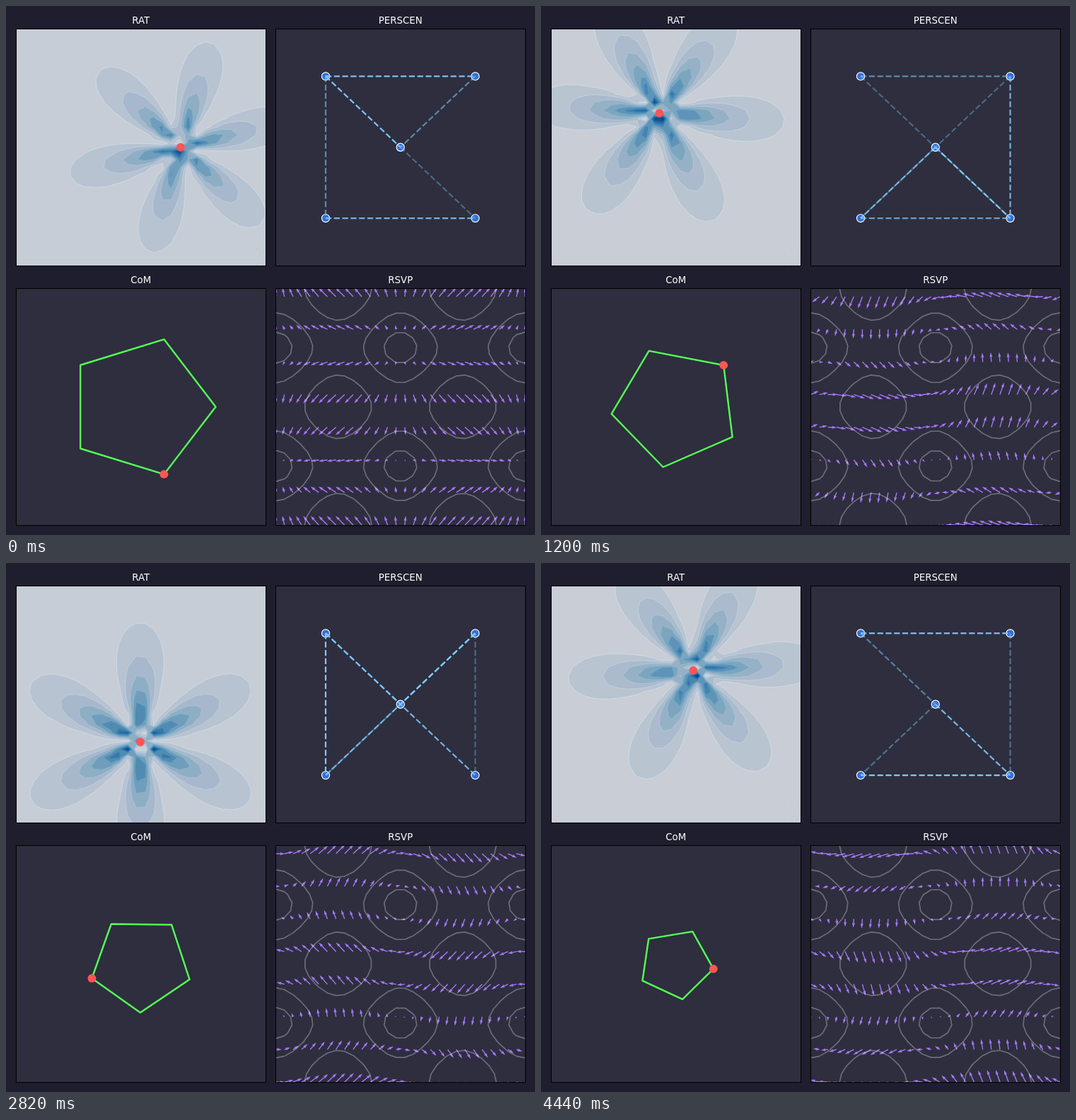
An HTML page for the animation above (4.5 s loop, 748x748 px).

```html
<!DOCTYPE html>
<html lang="en">
<head>
<meta charset="utf-8">
<title>Four panels</title>
<style>
  html, body { margin: 0; width: 100%; height: 100%; overflow: hidden; background: #1e1e2e; }
  svg { display: block; width: 100vw; height: 100vh; }
  text { font: 13.333px "DejaVu Sans", sans-serif; fill: #fff; text-anchor: middle; }
</style>
</head>
<body>
<svg id="stage" viewBox="0 0 748 748"></svg>
<script>
const NS = "http://www.w3.org/2000/svg";
const W = 352.5, H = 334.5, PI = Math.PI;
const N = 30, STEP = 2 * PI / (N - 1);
const grid = Array.from({ length: N }, (_, i) => -PI + i * STEP);
const stage = document.getElementById("stage");

function add(parent, tag, attrs) {
  const el = document.createElementNS(NS, tag);
  set(el, attrs);
  parent.appendChild(el);
  return el;
}
function set(el, attrs) {
  for (const k in attrs) el.setAttribute(k, attrs[k]);
}
const fix = v => v.toFixed(2);

// A square plot spanning -PI..PI on both axes.
function panel(x, y, title, id) {
  const box = { x, y, width: W, height: H };
  const clip = add(stage, "clipPath", { id });
  add(clip, "rect", box);
  add(stage, "rect", { ...box, fill: "#2e2e3e" });
  const body = add(stage, "g", { "clip-path": `url(#${id})` });
  add(stage, "rect", { ...box, fill: "none", stroke: "#000", "shape-rendering": "crispEdges" });
  add(stage, "text", { x: x + W / 2, y: y - 7.4 }).textContent = title;
  return {
    body,
    top: add(stage, "g", {}),
    px: v => x + W * (v + PI) / (2 * PI),
    py: v => y + H * (PI - v) / (2 * PI)
  };
}

const rat = panel(14.5, 32.5, "RAT", "c0");
const net = panel(381.5, 32.5, "PERSCEN", "c1");
const com = panel(14.5, 399.5, "CoM", "c2");
const rsvp = panel(381.5, 399.5, "RSVP", "c3");

// Area at or above a level, and its boundary, as path strings.
function contour(p, z, level) {
  let fill = "", line = "";
  const pt = q => fix(p.px(q.x)) + " " + fix(p.py(q.y));
  const poly = qs => { fill += "M" + qs.map(pt).join("L") + "Z"; };
  const seg = (a, b) => { line += "M" + pt(a) + "L" + pt(b); };
  for (let j = 0; j < N - 1; j++) {
    for (let i = 0; i < N - 1; i++) {
      const cell = [[i, j], [i + 1, j], [i + 1, j + 1], [i, j + 1]]
        .map(([a, b]) => ({ x: grid[a], y: grid[b], v: z[b][a], kind: "in" }));
      if (cell.every(c => c.v < level)) continue;
      const qs = [];
      cell.forEach((a, k) => {
        const b = cell[(k + 1) % 4];
        if (a.v >= level) qs.push(a);
        if ((a.v >= level) !== (b.v >= level)) {
          const f = (level - a.v) / (b.v - a.v);
          qs.push({
            x: a.x + f * (b.x - a.x),
            y: a.y + f * (b.y - a.y),
            kind: a.v >= level ? "down" : "up"
          });
        }
      });
      const mean = cell.reduce((s, c) => s + c.v, 0) / 4;
      if (qs.filter(q => q.kind === "up").length === 2 && mean < level) {
        if (qs[0].kind === "in") qs.unshift(qs.pop());
        for (const k of [0, 3]) {
          poly(qs.slice(k, k + 3));
          seg(qs[k], qs[k + 2]);
        }
      } else {
        poly(qs);
        qs.forEach((q, k) => { if (q.kind === "down") seg(q, qs[(k + 1) % qs.length]); });
      }
    }
  }
  return { fill, line };
}
const sample = f => grid.map(y => grid.map(x => f(x, y)));

// RAT: six rotating petals around a circling cue
const BLUES = [[247, 251, 255], [222, 235, 247], [198, 219, 239], [158, 202, 225], [107, 174, 214],
  [66, 146, 198], [33, 113, 181], [8, 81, 156], [8, 48, 107]];
const FACE = [46, 46, 62];
function blues(f) {
  const k = Math.min(7, Math.floor(f * 8)), r = f * 8 - k;
  return BLUES[k].map((c, i) => c + r * (BLUES[k + 1][i] - c));
}
const over = (c, back) => c.map((v, i) => 0.8 * v + 0.2 * back[i]);
const rgb = c => `rgb(${c.map(Math.round)})`;

const bands = Array.from({ length: 14 }, () => ({
  fill: add(rat.body, "path", {}),
  line: add(rat.body, "path", { fill: "none", "stroke-width": 0.9, "stroke-opacity": 0.7 })
}));
const cue = add(rat.top, "circle", { r: 5.9, fill: "#ff5555" });

function niceStep(raw) {
  const scale = 10 ** Math.floor(Math.log10(raw));
  return scale * [1, 1.5, 2, 2.5, 3, 4, 5, 6, 8, 10].find(s => s * scale >= raw);
}

function drawRat(t) {
  const cx = Math.cos(t), cy = Math.sin(t);
  const z = sample((x, y) => {
    const dx = x - cx, dy = y - cy;
    return Math.exp(-0.8 * Math.hypot(dx, dy)) * (0.5 + 0.5 * Math.sin(6 * Math.atan2(dy, dx) + t));
  });
  const all = z.flat(), max = Math.max(...all);
  const step = niceStep((max - Math.min(...all)) / 11);
  const count = Math.ceil(max / step);
  bands.forEach((band, k) => {
    if (k >= count) {
      set(band.fill, { d: "" });
      set(band.line, { d: "" });
      return;
    }
    const color = blues((k + 0.5) / count), shown = over(color, FACE);
    const c = contour(rat, z, k * step);
    set(band.fill, { d: c.fill, fill: rgb(shown) });
    if (k > 0) {
      const below = over(blues((k - 0.5) / count), FACE);
      set(band.line, { d: c.line, stroke: rgb(over(color, below)) });
    }
  });
  set(cue, { cx: rat.px(cx), cy: rat.py(cy) });
}

// PERSCEN: fully linked nodes with pulsing weights
const nodes = [[-1, 1], [1, 1], [0, 0], [-1, -1], [1, -1]]
  .map(([x, y]) => [net.px(x * 0.6 * PI), net.py(y * 0.6 * PI)]);
for (const [cx, cy] of nodes) {
  add(net.body, "circle", { cx, cy, r: 5.6, fill: "#3670d6", stroke: "#fff", "stroke-width": 1.2 });
}
const links = [];
nodes.forEach((a, i) => nodes.forEach((b, j) => {
  if (i < j) links.push({
    phase: i + j,
    el: add(net.body, "path", {
      d: `M${a}L${b}`, stroke: "#80ccff", "stroke-width": 2.22, "stroke-dasharray": "8.22 3.56"
    })
  });
}));

function drawNet(t) {
  for (const { phase, el } of links) {
    const w = 0.5 + 0.5 * Math.sin(t + phase);
    set(el, { "stroke-opacity": w > 0.3 ? fix(w) : 0 });
  }
}

// CoM: shrinking, turning pentagon
const ring = add(com.body, "polygon", {
  fill: "none", stroke: "#55ff55", "stroke-width": 2.4, "stroke-linejoin": "round"
});
const tip = add(com.top, "circle", { r: 5.9, fill: "#ff5555" });

function drawCom(t) {
  const r = 0.6 * PI * (1 - t / 15);
  const pts = [0, 1, 2, 3, 4].map(k => {
    const a = t + k * 2 * PI / 5;
    return [fix(com.px(r * Math.cos(a))), fix(com.py(r * Math.sin(a)))];
  });
  set(ring, { points: pts.join(" ") });
  set(tip, { cx: pts[4][0], cy: pts[4][1] });
}

// RSVP: rotating vector field over fixed magnitude contours
const size = (x, y) => Math.hypot(Math.sin(x), Math.cos(y));
const sizes = sample(size);
const spots = [];
for (let j = 0; j < N; j += 4) {
  for (const x of grid) spots.push([x, grid[j]]);
}
const root = Math.sqrt(spots.length);
const meanSize = spots.reduce((s, [x, y]) => s + size(x, y), 0) / spots.length;
const unit = 0.06 * W / root;
const reach = W / (1.8 * meanSize * root);

const arrows = add(rsvp.body, "path", { fill: "#aa77ff" });
add(rsvp.body, "path", {
  d: [0.4, 0.8, 1.2].map(v => contour(rsvp, sizes, v).line).join(""),
  fill: "none", stroke: "#fff", "stroke-opacity": 0.3, "stroke-width": 1.67, "stroke-linecap": "round"
});

function arrow(x, y, u, v) {
  const mag = Math.hypot(u, v), len = mag * reach / unit;
  const c = u / mag, s = v / mag;
  let shape;
  if (len < 1) {
    shape = [0, 1, 2, 3, 4, 5].map(k => [Math.cos(k * PI / 3) / 2, Math.sin(k * PI / 3) / 2]);
  } else {
    const full = Math.max(len, 5), k = Math.min(1, len / 5);
    const half = [[0, 0.5], [full - 4.5, 0.5], [full - 5, 1.5]];
    shape = [...half, [full, 0], ...half.map(([a, b]) => [a, -b]).reverse()]
      .map(([a, b]) => [a * k, b * k]);
  }
  return "M" + shape.map(([a, b]) =>
    fix(rsvp.px(x) + unit * (a * c - b * s)) + " " + fix(rsvp.py(y) - unit * (a * s + b * c))
  ).join("L") + "Z";
}

function drawRsvp(t) {
  const c = Math.cos(t), s = Math.sin(t);
  set(arrows, {
    d: spots.map(([x, y]) => {
      const a = Math.sin(x), b = -Math.cos(y);
      return arrow(x, y, a * c - b * s, a * s + b * c);
    }).join("")
  });
}

let shown = -1;
function draw(ms) {
  const tick = Math.floor(ms / 60) % 75;
  if (tick !== shown) {
    shown = tick;
    const t = tick * 0.1;
    drawRat(t);
    drawNet(t);
    drawCom(t);
    drawRsvp(t);
  }
}
function loop(now) {
  draw(Math.max(0, now));
  requestAnimationFrame(loop);
}
draw(0);
requestAnimationFrame(loop);
</script>
</body>
</html>
```
